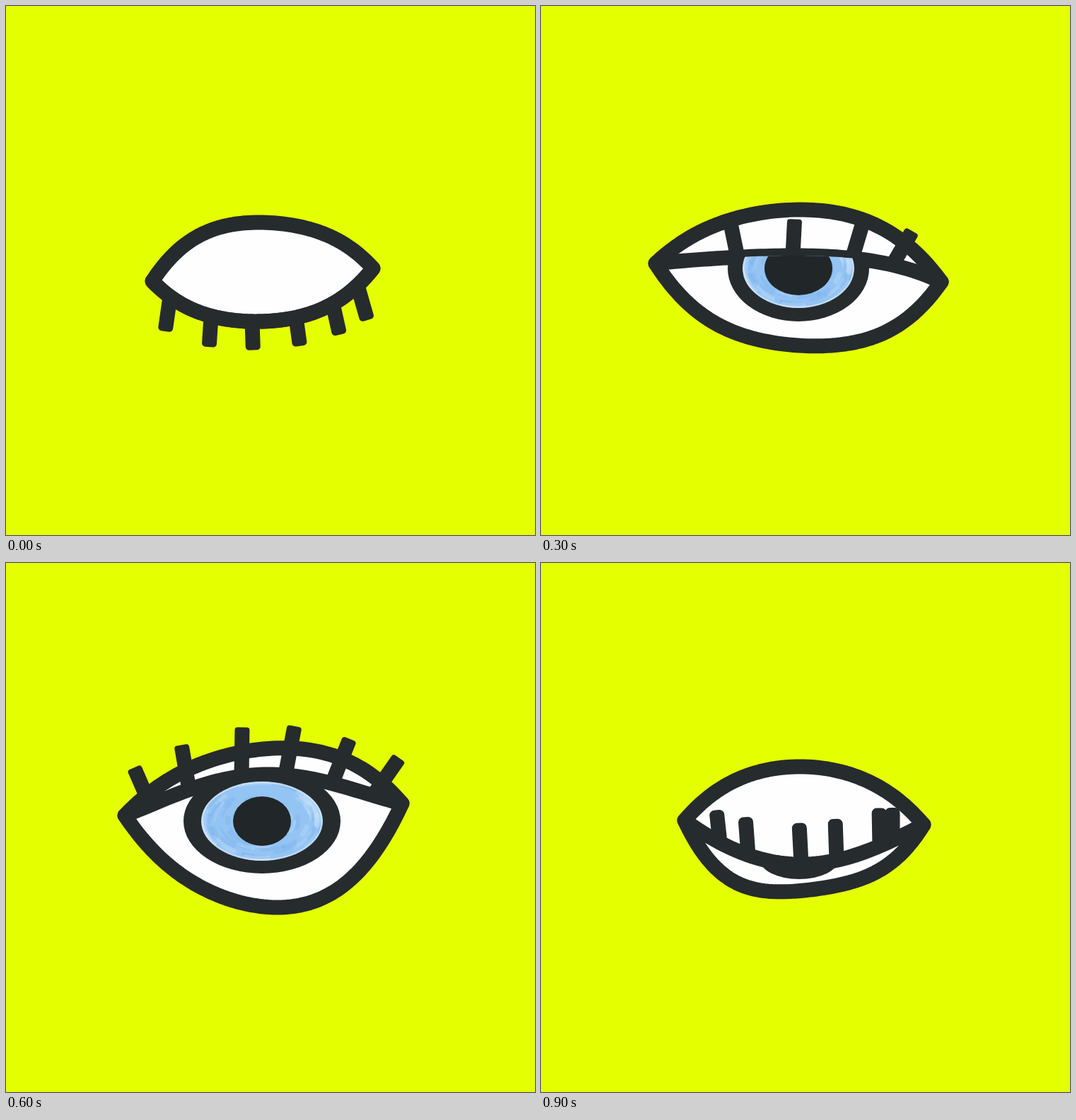
Recreate the animation shown at these times as an HTML page with a canvas. Size 748 px wide and 748 px high, loop 1 s.

```html
<!DOCTYPE html>
<html lang="en">
<head>
<meta charset="utf-8">
<title>Blinking eye</title>
<style>
html, body { margin: 0; height: 100%; overflow: hidden; background: #e4ff00; }
canvas { display: block; width: 100vw; height: 100vh; }
</style>
</head>
<body>
<canvas id="stage" width="748" height="748"></canvas>
<script>
const ctx = document.getElementById('stage').getContext('2d');
const LIME = '#e4ff00', INK = '#262b2e', PUPIL = '#212628', WHITE = '#fefefe', PEN = 21;

// left, right: corners of the eye. top, lid, bottom: heights at its quarter points.
// iris: centre, then x and y radii of the ring, the blue and the pupil.
// lashes: x of the roots; they rise by reach (plus arch in the middle) and lean from first to last.
const poses = [
  { left: [207, 389], right: [519, 371], top: [319, 306, 319], bottom: [437, 446, 431], lid: [437, 446, 431],
    lashes: [232, 290, 348, 410, 462, 497], reach: -49, arch: 9, lean: [-7, 14], tip: 5 },
  { left: [203, 364], right: [541, 370], top: [302, 288, 306], bottom: [457, 463, 445], lid: [411, 426, 409],
    iris: [365, 420, 55, 27, 0, 0, 0, 0],
    lashes: [253, 293, 368, 418, 479, 497], reach: 46, arch: 13, lean: [-5, 0], tip: 7 },
  { left: [180, 386], right: [550, 364], top: [300, 278, 286], bottom: [455, 478, 465], lid: [394, 402, 402],
    iris: [363, 395, 79, 62, 52, 48, 40, 23],
    lashes: [230, 269, 343, 408, 473, 503], reach: 49, arch: 2, lean: [-14, 12], tip: 10 },
  { left: [162, 364], right: [566, 390], top: [304, 288, 306], bottom: [457, 480, 470], lid: [356, 353, 360],
    iris: [364, 371, 100, 75, 79, 56, 48, 38],
    lashes: [278, 356, 440, 497], reach: 48, arch: 4, lean: [-10, 28], tip: 4 },
  { left: [168, 357], right: [560, 340], top: [288, 263, 272], bottom: [453, 486, 466], lid: [318, 299, 312],
    iris: [362, 365, 111, 74, 86, 56, 41, 35],
    lashes: [204, 259, 333, 395, 461, 519], reach: 53, arch: 17, lean: [-23, 37], tip: 4 },
  { left: [163, 370], right: [574, 388], top: [271, 242, 268], bottom: [486, 520, 485], lid: [271, 242, 268],
    iris: [367, 380, 102, 99, 82, 81, 49, 47],
    lashes: [168, 246, 376, 465, 541, 577], reach: 78, arch: -22, lean: [-43, 38], tip: 9 }
];

// Smooth height through both corners and three quarter points (Lagrange).
function heightAt(pose, inner, x) {
  const ys = [pose.left[1], ...inner, pose.right[1]];
  const u = 4 * (x - pose.left[0]) / (pose.right[0] - pose.left[0]);
  return ys.reduce((sum, y, i) =>
    sum + ys.reduce((term, _, j) => i === j ? term : term * (u - j) / (i - j), y), 0);
}

function edge(pose, inner) {
  const steps = 60, [x0] = pose.left, width = pose.right[0] - x0;
  return Array.from({ length: steps + 1 }, (_, i) => {
    const x = x0 + width * i / steps;
    return [x, heightAt(pose, inner, x)];
  });
}

function line(points) {
  const path = new Path2D();
  points.forEach(p => path.lineTo(...p));
  return path;
}

function ellipse(cx, cy, rx, ry) {
  const path = new Path2D();
  path.ellipse(cx, cy, rx, ry, 0, 0, 7);
  return path;
}

function fill(color, path) {
  ctx.fillStyle = color;
  ctx.fill(path);
}

function stroke(color, width, path) {
  ctx.strokeStyle = color;
  ctx.lineWidth = width;
  ctx.stroke(path);
}

// Marker bar with corners rounded by r.
function lash(x1, y1, x2, y2, r) {
  const len = Math.hypot(x2 - x1, y2 - y1);
  ctx.save();
  ctx.translate(x1, y1);
  ctx.rotate(Math.atan2(y2 - y1, x2 - x1));
  const bar = new Path2D();
  bar.roundRect(0, -PEN / 2, len, PEN, r);
  fill(INK, bar);
  ctx.restore();
}

// Blue crayon with a pale rim and seeded curved streaks.
function crayon(cx, cy, rx, ry) {
  const path = ellipse(cx, cy, rx, ry);
  let seed = 7;
  const rnd = () => (seed = seed * 16807 % 2147483647) / 2147483647;
  ctx.save();
  ctx.clip(path);
  fill('#94c4f3', path);
  for (let i = 0; i < 60; i++) {
    const size = 0.5 + rnd() / 2, start = rnd() * 6.28;
    const streak = new Path2D();
    streak.ellipse(cx, cy, rx * size, ry * size, 0, start, start + 0.2 + rnd() / 2);
    stroke(i % 2 ? 'rgba(100,162,226,.2)' : 'rgba(210,232,250,.26)', 2 + rnd() * 6, streak);
  }
  stroke('rgba(222,238,250,.6)', 5, path);
  ctx.restore();
}

function drawIris(lid, [cx, cy, ringX, ringY, blueX, blueY, pupilX, pupilY]) {
  ctx.save();
  ctx.clip(line([...lid, [748, 748], [0, 748]]));
  fill(INK, ellipse(cx, cy, ringX, ringY));
  if (blueX) {
    crayon(cx, cy, blueX, blueY);
    fill(PUPIL, ellipse(cx, cy, pupilX, pupilY));
  }
  ctx.restore();
}

function draw(pose) {
  ctx.lineJoin = ctx.lineCap = 'round';
  fill(LIME, line([[0, 0], [748, 0], [748, 748], [0, 748]]));
  const lid = edge(pose, pose.lid);
  const outline = line([...edge(pose, pose.top), ...edge(pose, pose.bottom).reverse()]);
  fill(WHITE, outline);
  stroke(INK, PEN, outline);
  stroke(INK, PEN, line(lid));
  pose.lashes.forEach((x, i, all) => {
    const u = i / (all.length - 1), [first, last] = pose.lean;
    const y = heightAt(pose, pose.lid, x);
    const rise = pose.reach + pose.arch * Math.sin(Math.PI * u);
    lash(x + first + (last - first) * u, y - rise, x, y, pose.tip);
  });
  if (pose.iris) drawIris(lid, pose.iris);
}

// The lid opens over five steps and closes the same way.
let shown = -1;
function frame() {
  const step = Math.floor(performance.now() % 1000 / 100);
  const next = step > 5 ? 10 - step : step;
  if (next !== shown) draw(poses[shown = next]);
  requestAnimationFrame(frame);
}
frame();
</script>
</body>
</html>
```
